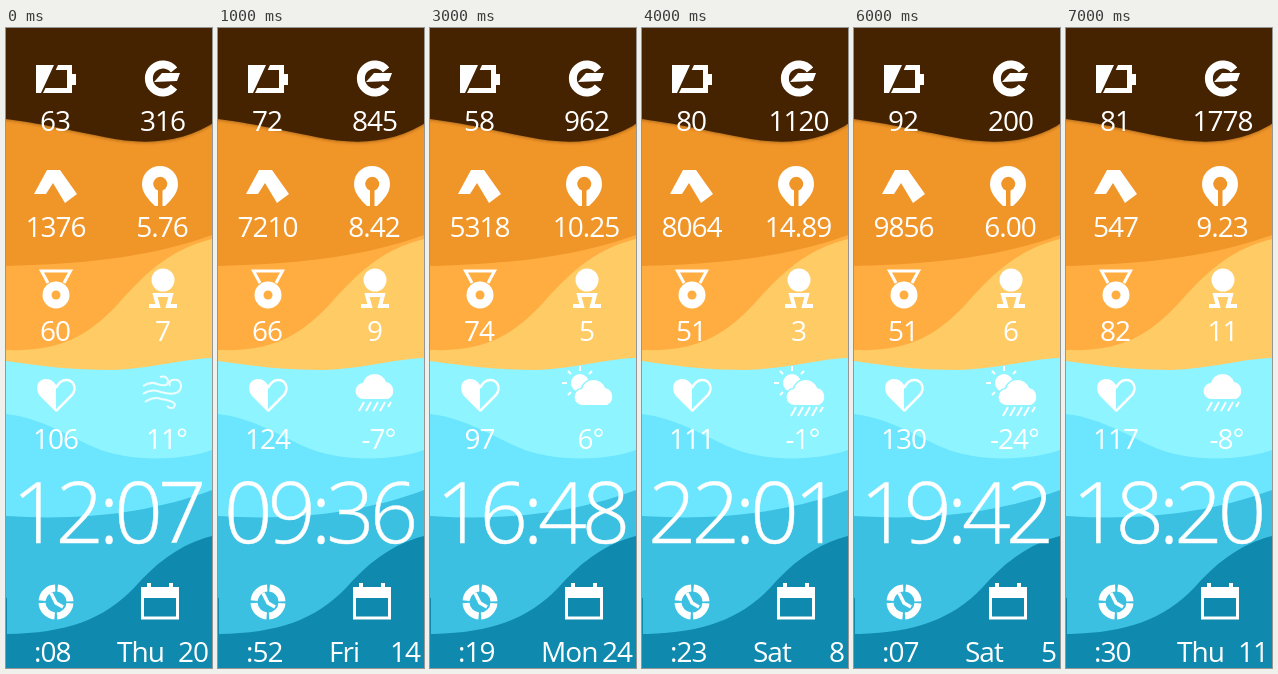
These frames come from a looping animation (206 by 640 pixels, 8 s). An HTML page:

```html
<!DOCTYPE html>
<html lang="en">
<head>
<meta charset="utf-8">
<title>Watch face</title>
<style>
  html, body { margin: 0; width: 100%; height: 100%; overflow: hidden; background: #1089ae; }
  svg { display: block; width: 206px; height: 640px; }
  text { font: 400 28px "Open Sans", "Noto Sans", sans-serif; letter-spacing: -1px; fill: #fff; }
  .mid { text-anchor: middle; }
  .end { text-anchor: end; }
  #time { font-size: 85px; font-weight: 300; letter-spacing: -5px; stroke: #fff; stroke-width: .5; }
  .line { fill: none; stroke: #fff; stroke-width: 2; }
</style>
</head>
<body>
<svg viewBox="0 0 206 640">
  <defs>
    <filter id="shade" x="-10%" y="-10%" width="120%" height="130%">
      <feDropShadow dx="0" dy="1" stdDeviation="1.5" flood-color="#452204" flood-opacity=".4"/>
    </filter>
    <path id="cloud" d="M8 26a8 8 0 0 1-1-16a12 12 0 0 1 23-1a9 9 0 0 1 2 17z"/>
    <g id="sun">
      <circle cx="150" cy="355" r="9"/>
      <path class="line" d="M150 338v5M132 355h5M138 343l3 3M162 343l-3 3M138 367l3-3"/>
      <use href="#cloud" x="145" y="351" stroke="#8ef4ff" stroke-width="3" paint-order="stroke"/>
    </g>
    <path id="rain" class="line" d="M146 374l-5 9M153 374l-5 9M160 374l-5 9M167 374l-5 9M173 374l-3 5"/>
  </defs>

  <!-- Dunes and sea -->
  <rect width="206" height="345" fill="#f09528"/>
  <path fill="#452204" filter="url(#shade)" d="M-9-9H215V90C180 115 142 118 98 109C60 102 35 95-9 90z"/>
  <path fill="#ffad40" d="M0 238C70 236 140 231 206 207V345H0z"/>
  <path fill="#ffcb64" d="M0 322C60 324 85 304 112 276C138 247 162 222 206 211V345H0z"/>
  <path fill="#8ef4ff" d="M0 333C35 338 65 342 105 342C145 341 175 331 206 330V640H0z"/>
  <path fill="#6be6fe" d="M0 386C35 390 62 408 90 420C120 433 172 434 206 422V640H0z"/>
  <path fill="#3bc0e1" d="M0 488C75 493 145 485 206 462V640H0z"/>
  <path fill="#1089ae" d="M0 570H1V606C60 605 97 592 128 560C150 535 174 516 206 508V640H0z"/>

  <g fill="#fff">
    <!-- Battery -->
    <path d="M30 37H48L35 65H30zM52 37H66V46H70V57H66V65H37L39.500 60H61V42H49.700z"/>
    <!-- Energy -->
    <path class="line" style="stroke-width:8" d="M168 42A14 14 0 1 0 168 59"/>
    <path d="M148 54L156 45H174L171 53z"/>
    <!-- Steps -->
    <path d="M41 142H54L71 166L59 175L47 155L40 166H28z"/>
    <!-- Distance -->
    <path d="M154 138a18 18 0 0 1 18 18c0 9-6 15-13 22h-10c-7-7-13-13-13-22a18 18 0 0 1 18-18z"/>
    <path fill="#f09528" d="M152 179V162.500a7 7 0 1 1 4.500 0V179z"/>
    <!-- Medal -->
    <path class="line" style="stroke-width:3" d="M42 255L35.500 243H64.500L58 255"/>
    <circle cx="50" cy="267" r="13.500"/>
    <circle cx="50" cy="267" r="4.500" fill="#ffad40"/>
    <!-- Stand -->
    <circle cx="157" cy="252" r="11.500"/>
    <path class="line" style="stroke-width:4" d="M143 278H152L149 267H165L162 278H171"/>
    <!-- Heart -->
    <path d="M50 384L34 368C28 360 32 351 40 351C45 351 48 354 50 357V384z"/>
    <path class="line" style="stroke-width:2.500" d="M50 383L66 367C71 360 68 352 60 352C55 352 52 356 50 360"/>
    <!-- Seconds -->
    <circle class="line" cx="50" cy="574" r="14" style="stroke-width:7" stroke-dasharray="19.500 2.500" stroke-dashoffset="-1.250"/>
    <path class="line" style="stroke-width:3.500" d="M45 565L50 575L57 579"/>
    <!-- Calendar -->
    <path d="M135 559H173V570H135zM141 555h4v5h-4zM163 555h4v5h-4z"/>
    <path class="line" style="stroke-width:3" d="M136.500 560V590H171.500V560"/>

    <!-- Weather -->
    <g class="weather" id="wind">
      <path class="line" opacity=".85" d="M137 358q8-5 14-2q12 4 11-4q-2-5-8-3M137 366q9-6 18-2q18 5 20-5q0-9-9-7q-4 2-2 6M139 374q9-6 16-3q14 2 14 6q-2 6-8 1"/>
    </g>
    <g class="weather" id="snow"></g>
    <g class="weather" id="sunny"><use href="#sun"/></g>
    <g class="weather" id="showers"><use href="#sun"/><use href="#rain" x="8" y="5"/></g>
    <g class="weather" id="rainy"><use href="#cloud" x="138" y="345"/><use href="#rain"/></g>
  </g>

  <g class="mid">
    <text id="battery" x="49" y="103"/><text id="energy" x="156.500" y="103"/>
    <text id="steps" x="49.500" y="209"/><text id="distance" x="156" y="209"/>
    <text id="score" x="49" y="313"/><text id="stand" x="156.500" y="313"/>
    <text id="pulse" x="49.500" y="421"/><text id="degrees" x="160.500" y="421"/>
  </g>
  <text id="time" x="6" y="515"/>
  <text id="seconds" x="28" y="634"/>
  <text id="day" x="111" y="634"/>
  <text id="date" class="end" x="202" y="634"/>
</svg>
<script>
const $ = id => document.getElementById(id);
const fields = "battery energy steps distance score stand pulse degrees time seconds day date".split(" ");

// One reading per second: the fields in order, then the weather icon
const readings = [
  "63 316 1376 5.76 60 7 106 11° 12:07 :08 Thu 20 wind",
  "72 845 7210 8.42 66 9 124 -7° 09:36 :52 Fri 14 rainy",
  "81 138 14526 13.77 57 11 141 -4° 07:21 :36 Sun 19 snow",
  "58 962 5318 10.25 74 5 97 6° 16:48 :19 Mon 24 sunny",
  "80 1120 8064 14.89 51 3 111 -1° 22:01 :23 Sat 8 showers",
  "47 538 11436 11.60 80 0 80 -15° 15:25 :47 We 22 sunny",
  "92 200 9856 6.00 51 6 130 -24° 19:42 :07 Sat 5 showers",
  "81 1778 547 9.23 82 11 117 -8° 18:20 :30 Thu 11 rainy"
].map(line => line.split(" "));

for (let angle = 0; angle < 360; angle += 60)
  $("snow").innerHTML += `<path class="line" transform="translate(157 363) rotate(${angle})" d="M0 0V-18M-4-16L0-12L4-16M-4-10L0-6L4-10"/>`;

let shown = -1;
function draw(now) {
  const index = Math.floor(now / 1000) % readings.length;
  if (index !== shown) {
    shown = index;
    const values = readings[index];
    fields.forEach((id, i) => $(id).textContent = values[i]);
    document.querySelectorAll(".weather").forEach(icon =>
      icon.style.display = icon.id === values[fields.length] ? "" : "none");
  }
  requestAnimationFrame(draw);
}
draw(0);
</script>
</body>
</html>
```
